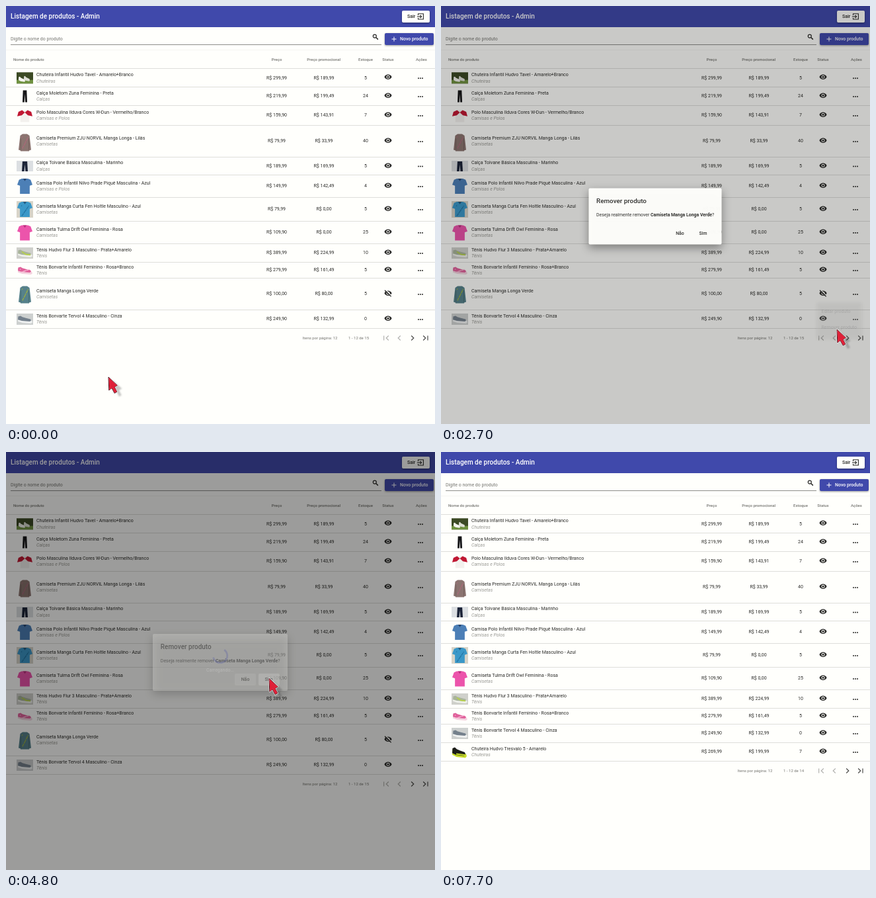
Recreate the animation shown at these times as an HTML page with a canvas. Size 649 by 632 pixels, loop 7.9 s.

```html
<!DOCTYPE html>
<html lang="pt-BR">
<head>
<meta charset="utf-8">
<title>Listagem de produtos</title>
<style>
html, body { margin: 0; width: 100%; height: 100%; overflow: hidden; background: #fffffc; }
canvas { display: block; }
</style>
</head>
<body>
<canvas id="stage" width="649" height="632"></canvas>
<script>
const g = document.getElementById('stage').getContext('2d');
const W = 649, H = 632, LOOP = 7900;
const INK = '#2a2a28', GREY = '#747470', BLUE = '#4049ab', PAPER = '#fffffc';

// ---------- helpers ----------
const clamp = v => Math.max(0, Math.min(1, v));
const ramp = (t, a, b) => clamp((t - a) / (b - a));
const smooth = p => p * p * (3 - 2 * p);

function text(s, x, y, { size = 7, weight = 400, color = INK, align = 'left', italic = '' } = {}) {
  g.font = `${italic} ${weight} ${size}px Roboto, Arial, sans-serif`;
  g.fillStyle = color;
  g.textAlign = align;
  g.fillText(s, x, y);
}
function rect(x, y, w, h, color) {
  g.fillStyle = color;
  g.fillRect(x, y, w, h);
}
function box(x, y, w, h, r, color, blur = 0, drop = 0) {
  g.save();
  if (blur) {
    g.shadowColor = 'rgba(0,0,0,.4)';
    g.shadowBlur = blur;
    g.shadowOffsetY = drop;
  }
  g.fillStyle = color;
  g.beginPath();
  g.roundRect(x, y, w, h, r);
  g.fill();
  g.restore();
}
function poly(pts, color, x = 0, y = 0, w = 1, h = 1) {
  g.beginPath();
  for (let i = 0; i < pts.length; i += 2) g.lineTo(x + pts[i] * w, y + pts[i + 1] * h);
  g.closePath();
  g.fillStyle = color;
  g.fill();
}
function line(pts, color, width = 1) {
  g.beginPath();
  for (let i = 0; i < pts.length; i += 2) g.lineTo(pts[i], pts[i + 1]);
  g.strokeStyle = color;
  g.lineWidth = width;
  g.stroke();
}
function disc(x, y, r, color) {
  g.beginPath();
  g.arc(x, y, r, 0, 7);
  g.fillStyle = color;
  g.fill();
}
function layer(alpha, draw) {
  if (alpha <= 0) return;
  g.save();
  g.globalAlpha = clamp(alpha);
  draw();
  g.restore();
}

// ---------- product pictures, drawn around the row centre ----------
const TEE = [.3, 0, .7, 0, .88, .08, 1, .4, .82, .47, .82, 1, .18, 1, .18, .47, 0, .4, .12, .08];
const SWEATER = [.32, 0, .68, 0, .87, .1, 1, .92, .86, .95, .84, 1, .16, 1, .14, .95, 0, .92, .13, .1];
const PANTS = [.1, 0, .9, 0, 1, 1, .6, 1, .5, .3, .4, 1, 0, 1];
const SHOE = [.02, .2, .2, .1, .34, .3, .6, .45, .95, .62, 1, .85, .9, 1, .3, .9, 0, .7];

const backdrop = (m, color, h = 17) => rect(16, m - h / 2, 25, h, color);
function dots(color, x, y, w, h) {
  for (let i = 0; i < 16; i++) rect(x + (i * 37 % 100) / 100 * w, y + (i * 61 % 97) / 97 * h, 1.2, 1.2, color);
}
function tee(m, color, collar) {
  poly(TEE, color, 17, m - 11.5, 23, 23);
  poly([.38, 0, .62, 0, .5, .16], collar, 17, m - 11.5, 23, 23);
}
function sweater(m, color, speck) {
  poly(SWEATER, color, 19, m - 12, 19, 26);
  line([22.5, m - 5, 22.5, m + 12], 'rgba(0,0,0,.25)', .7);
  line([34.5, m - 5, 34.5, m + 12], 'rgba(0,0,0,.25)', .7);
  dots(speck, 24, m - 8, 9, 18);
}
function shoe(m, body, sole, h = 12, x = 18) {
  poly(SHOE, sole, x, m - h / 2 + 1, 22, h);
  poly(SHOE, body, x, m - h / 2 - .5, 20, h - 1.5);
}

const PICS = {
  boots(m) {
    backdrop(m, '#3c4a25');
    rect(16, m + 3, 25, 5.5, '#6f9140');
    poly(SHOE, '#f4f4ee', 19, m - 3, 10, 9);
    poly(SHOE, '#dedfd6', 27, m - 4, 9, 9);
  },
  leggings(m) { poly(PANTS, '#151517', 25, m - 9, 7, 18); },
  duo(m) {
    poly(TEE, '#f3f1ee', 18, m - 8, 21, 18);
    poly([.32, 0, .5, .2, .3, .45, 0, .55, .08, .15], '#c01833', 17, m - 8, 23, 17);
    poly([.68, 0, .5, .2, .7, .45, 1, .55, .92, .15], '#c01833', 17, m - 8, 23, 17);
  },
  taupe(m) { sweater(m + 1, '#8b7470', '#b3667c'); },
  jeans(m) {
    backdrop(m, '#dcdfe2', 16);
    poly(PANTS, '#1c2438', 24, m - 7, 9, 15);
  },
  polo(m) { tee(m, '#4c7fb6', '#27456e'); },
  sky(m) {
    backdrop(m, '#d8d4c8', 25);
    tee(m, '#3b98c8', '#235a80');
    dots('#1f6d9b', 23, m - 6, 11, 16);
  },
  pink(m) { tee(m + .5, '#ec54ab', '#b82f7d'); },
  neon(m) {
    backdrop(m, '#cfd0cb');
    shoe(m, '#a9b49a', '#eef0ea', 11);
    line([24, m - 2, 30, m + 2, 37, m + 3], '#b9d63c', 1.5);
  },
  rose(m) {
    shoe(m, '#e0609a', '#f3d3df', 11);
    dots('#f9c3da', 21, m - 2, 14, 5);
  },
  green(m) { sweater(m, '#56818a', '#a9b92f'); },
  grey(m) {
    backdrop(m, '#cdd0cf');
    shoe(m, '#74808c', '#eff1f1', 11);
  },
  black(m) {
    shoe(m, '#1b1d18', '#c8dc2a', 16, 17);
    line([23, m + 3, 31, m + 4, 38, m + 5], '#c8dc2a', 2);
  }
};

// name, category, price, promo price, stock, row height, picture
const ROWS = [
  ['Chuteira Infantil Hudvo Tavel - Amarelo+Branco', 'Chuteiras', '299,99', '189,99', 5, 27.5, 'boots'],
  ['Calça Moletom Zuna Feminina - Preta', 'Calças', '219,99', '199,49', 24, 28, 'leggings'],
  ['Polo Masculina Ilduva Cores W-Dun - Vermelho/Branco', 'Camisas e Polos', '159,90', '143,91', 7, 30, 'duo'],
  ['Camiseta Premium ZJU NORVIL Manga Longa - Lilás', 'Camisetas', '79,99', '33,99', 40, 48, 'taupe'],
  ['Calça Tolvane Básica Masculina - Marinho', 'Calças', '189,99', '169,99', 5, 27, 'jeans'],
  ['Camisa Polo Infantil Nilvo Prade Piquê Masculina - Azul', 'Camisas e Polos', '149,99', '142,49', 4, 34, 'polo'],
  ['Camiseta Manga Curta Fen Holtle Masculino - Azul', 'Camisetas', '79,99', '0,00', 5, 36, 'sky'],
  ['Camiseta Tulma Drift Owl Feminina - Rosa', 'Camisetas', '109,90', '0,00', 25, 34, 'pink'],
  ['Tênis Hudvo Flur 3 Masculino - Prata+Amarelo', 'Tênis', '389,99', '224,99', 10, 28, 'neon'],
  ['Tênis Bonvarte Infantil Feminino - Rosa+Branco', 'Tênis', '279,99', '161,49', 5, 24, 'rose'],
  ['Camiseta Manga Longa Verde', 'Camisetas', '100,00', '80,00', 5, 48, 'green'],
  ['Tênis Bonvarte Tervol 4 Masculino - Cinza', 'Tênis', '249,90', '132,99', 0, 28, 'grey'],
  ['Chuteira Hudvo Tresvalo 5 - Amarelo', 'Chuteiras', '269,99', '199,99', 7, 28, 'black']
];
const HIDDEN = 10;
const BEFORE = ROWS.slice(0, 12);
const AFTER = ROWS.filter((r, i) => i !== HIDDEN);

// ---------- page ----------
function eye(x, y, off) {
  g.beginPath();
  g.moveTo(x - 5.6, y);
  g.bezierCurveTo(x - 3.4, y - 5, x + 3.4, y - 5, x + 5.6, y);
  g.bezierCurveTo(x + 3.4, y + 5, x - 3.4, y + 5, x - 5.6, y);
  g.fillStyle = INK;
  g.fill();
  disc(x, y, 2.5, PAPER);
  disc(x, y, 1.5, INK);
  if (off) {
    line([x - 4, y - 5.4, x + 5.6, y + 4.2], PAPER, 1.2);
    line([x - 5, y - 4.6, x + 4.6, y + 4.9], INK, 1.2);
  }
}

function header(hover) {
  rect(0, 0, W, H, PAPER);
  rect(0, 0, W, 32, BLUE);
  text('Listagem de produtos - Admin', 7, 19, { size: 10, weight: 500, color: '#fff' });
  box(599, 7, 42, 18, 2, PAPER, 3, 1);
  text('Sair', 607, 18, { weight: 500 });
  line([623.5, 14, 623.5, 11.8, 631.4, 11.8, 631.4, 20, 623.5, 20, 623.5, 18], INK, 1.1);
  line([622, 16, 628.5, 16], INK, 1.1);
  line([626.4, 13.8, 628.6, 16, 626.4, 18.2], INK, 1.1);

  text('Digite o nome do produto', 7, 52, { color: GREY });
  if (hover) rect(7, 58, 561, 1.6, '#333331');
  else rect(7, 58, 561, 1, '#8e8e8b');
  g.beginPath();
  g.arc(557.8, 45.6, 2.5, 0, 7);
  g.strokeStyle = INK;
  g.lineWidth = 1.2;
  g.stroke();
  line([559.7, 47.5, 562.8, 50.6], INK, 1.5);

  box(573, 41, 74, 18, 2, BLUE, 3, 1);
  line([583.5, 50, 590.5, 50], '#fff');
  line([587, 46.5, 587, 53.5], '#fff');
  text('Novo produto', 596, 52, { weight: 500, color: '#fff' });

  rect(0, 66, W, 1, 'rgba(0,0,0,.04)');
  const head = (s, x, align = 'center') => text(s, x, 83, { size: 6, weight: 500, color: GREY, align });
  head('Nome do produto', 11, 'left');
  head('Preço', 409.5);
  head('Preço promocional', 480.7);
  head('Estoque', 544);
  head('Status', 578);
  head('Ações', 628.5);
  rect(0, 94, W, 1, '#dededb');
}

function table(rows, total) {
  let top = 94.5;
  for (const [name, kind, price, promo, stock, h, pic] of rows) {
    const m = top + h / 2, base = Math.round(m + 2.4);
    PICS[pic](m + .5);
    text(name, 46, Math.round(m - 2.5));
    text(kind, 46, Math.round(m + 7.3), { italic: 'italic', color: '#999995' });
    const cell = (s, x) => text(s, x, base, { align: 'center' });
    cell('R$ ' + price, 409.5);
    cell('R$ ' + promo, 481);
    cell(stock, 544);
    eye(578, Math.round(m) - .7, pic === 'green');
    for (const dx of [-3, 0, 3]) disc(627 + dx, m + .9, 1, INK);
    top += h;
    rect(0, Math.floor(top), W, 1, '#dededb');
  }
  const y = Math.round(top) + 15;
  text('Itens por página: 12', 448.7, y + 2, { size: 6, color: GREY });
  text('1 - 12 de ' + total, 518, y + 2, { size: 6, color: GREY });
  const chevron = (x, d, color) => line([x - 1.8 * d, y - 3.5, x + 1.8 * d, y, x - 1.8 * d, y + 3.5], color, 1.2);
  const pale = '#b3b3b0', dark = '#4b4b49';
  line([571.6, y - 3.6, 571.6, y + 3.6], pale, 1.2);
  chevron(577, -1, pale);
  chevron(595, -1, pale);
  chevron(615, 1, dark);
  chevron(633, 1, dark);
  line([638, y - 3.6, 638, y + 3.6], dark, 1.2);
}

// ---------- overlays ----------
function menu(t) {
  const grow = t < 1600 ? .8 : 1;
  const alpha = t < 1600 ? .6 : 1 - 1.28 * ramp(t, 2500, 2800);
  layer(alpha, () => {
    g.translate(637, 446);
    g.scale(grow, grow);
    g.translate(-637, -446);
    box(568, 446, 69, 56, 2, PAPER, 5, 2);
    if (t >= 1900) rect(568, 474, 69, 24, '#f2f2ef');
    text('Editar produto', 575.5, 464);
    text('Remover produto', 575.5, 488);
  });
}

function dialog(t) {
  const k = ramp(t, 2500, 2800);
  const alpha = t < 4800 ? k * 1.45 : 1 - ramp(t, 4700, 4900);
  layer(alpha, () => {
    const s = 1 - .2 * Math.pow(1 - k, 2.4);
    g.translate(324, 318);
    g.scale(s, s);
    g.translate(-324, -318);
    box(222, 275, 204, 86, 2, PAPER, 14, 5);
    text('Remover produto', 233.8, 298, { size: 10, weight: 500 });
    const lead = 'Deseja realmente remover ', item = ROWS[HIDDEN][0];
    let x = 233.8;
    text(lead, x, 318);
    x += g.measureText(lead).width;
    text(item, x, 318, { weight: 700 });
    x += g.measureText(item).width;
    text('?', x, 318);
    if (t >= 2800) box(346, 335, 32, 18, 2, t >= 4000 && t < 4200 ? '#d8d8d5' : '#e1e1de');
    if (t >= 4400) box(382, 335, 32, 18, 2, '#f3f3f0');
    if (t >= 4700) disc(398, 344, 7, '#e6e6e3');
    text('Não', 362, 346, { weight: 500, align: 'center' });
    text('Sim', 397.5, 346, { weight: 500, align: 'center' });
  });
}

function snack(t) {
  const alpha = t < 5200 ? .85 : 1 - ramp(t, 6600, 6900);
  layer(alpha, () => {
    const s = t < 5200 ? .988 : 1;
    g.translate(324, 612);
    g.scale(s, s);
    g.translate(-324, -612);
    box(238, 600, 172, 24, 2, '#31312e', 5, 2);
    text('Produto removido com sucesso', 246, 614, { color: '#d2d2ce' });
    box(369, 603, 37, 18, 2, t >= 6400 ? '#70706c' : '#656561');
    text('Fechar', 387.5, 614, { weight: 500, color: '#f0f0ec', align: 'center' });
  });
}

function loader(t) {
  const k = ramp(t, 4700, 5100);
  rect(0, 0, W, H, `rgba(0,0,0,${.9 * k})`);
  layer(k, () => {
    const turn = (t - 5100) * .0047;
    g.beginPath();
    g.arc(324, 308, 10.8, .45 + turn, 4.3 + turn);
    g.strokeStyle = '#434ca6';
    g.lineWidth = 2.6;
    g.stroke();
    text('Carregando...', 324, 332, { color: '#fff', align: 'center' });
  });
}

// ---------- pointer ----------
const PATH = [
  [400, 155, 561], [1000, 605, 448], [1100, 605, 448], [1300, 627, 437], [1700, 627, 437],
  [1900, 607, 467], [2100, 599, 489], [2700, 599, 489], [3000, 482, 499], [3100, 482, 499],
  [3900, 362, 352], [4200, 390, 344], [4300, 390, 344], [4400, 398, 342], [5500, 398, 343],
  [6000, 402, 571], [6300, 386, 592], [6500, 386, 604], [6600, 386, 604], [7400, 392, 60], [7700, 380, -30]
];
const HAND_TIMES = [[1200, 1500], [1900, 2600], [4000, 4800], [6400, 6700]];
const ARROW = [0, 0, .8, 20, 5, 16.6, 9.2, 24.4, 12.8, 22.4, 9, 15, 13.4, 12.6];

function place(t) {
  if (t <= PATH[0][0]) return PATH[0].slice(1);
  const i = PATH.findIndex(p => p[0] >= t);
  const [t0, x0, y0] = PATH[i - 1], [t1, x1, y1] = PATH[i];
  const p = smooth((t - t0) / (t1 - t0));
  return [x0 + (x1 - x0) * p, y0 + (y1 - y0) * p];
}
function arrow() {
  g.save();
  g.filter = 'blur(1.2px)';
  poly(ARROW, 'rgba(70,70,70,.3)', 7, 5);
  g.restore();
  poly(ARROW, '#df2038');
  g.lineJoin = 'round';
  g.strokeStyle = 'rgba(255,255,255,.85)';
  g.lineWidth = 2.2;
  g.stroke();
  g.strokeStyle = '#43141c';
  g.lineWidth = 1;
  g.stroke();
  poly(ARROW, '#df2038', .5, .8, .95, .95);
}
function hand() {
  g.beginPath();
  g.moveTo(-1.7, 1.4);
  g.quadraticCurveTo(0, -1.4, 1.7, 1.4);
  g.lineTo(2, 6.4);
  g.quadraticCurveTo(4, 5, 5.2, 7);
  g.quadraticCurveTo(7.2, 5.7, 8.3, 7.8);
  g.quadraticCurveTo(11, 7, 11.3, 9.6);
  g.lineTo(11, 13.5);
  g.lineTo(9.4, 18);
  g.lineTo(-.4, 18);
  g.lineTo(-5, 10.8);
  g.quadraticCurveTo(-4.8, 8.2, -1.7, 10.6);
  g.closePath();
  g.fillStyle = '#fff';
  g.fill();
  g.lineJoin = 'round';
  g.strokeStyle = '#111';
  g.lineWidth = 1.4;
  g.stroke();
  for (const x of [2, 5.2, 8.3]) line([x, 7, x, 10], '#111', .9);
}
function pointer(t) {
  if (t >= 7700) return;
  const isHand = HAND_TIMES.some(([a, b]) => t >= a && t < b);
  g.save();
  g.translate(...place(t));
  if (t === 2400 || t === 2500) g.scale(.93, .93);
  (isHand ? hand : arrow)();
  g.restore();
}

// ---------- loop ----------
function draw(ms) {
  const t = Math.floor(ms % LOOP / 100) * 100;
  const done = t >= 5200;
  header(t >= 7400 && t < 7600);
  table(done ? AFTER : BEFORE, done ? 14 : 15);
  if (t >= 1500 && t < 1800) disc(627, 437, 11, 'rgba(0,0,0,.09)');
  if (t >= 1500 && t < 2800) menu(t);
  if (t >= 5000 && t < 6900) snack(t);
  if (t >= 2600 && !done) {
    const dim = .32 * ramp(t, 2500, 2800) * (1 - ramp(t, 4700, 5000));
    rect(0, 0, W, H, `rgba(0,0,0,${dim})`);
    dialog(t);
  }
  if (t >= 4800 && !done) loader(t);
  pointer(t);
}
const start = performance.now();
function tick() {
  draw(performance.now() - start);
  requestAnimationFrame(tick);
}
tick();
</script>
</body>
</html>
```
